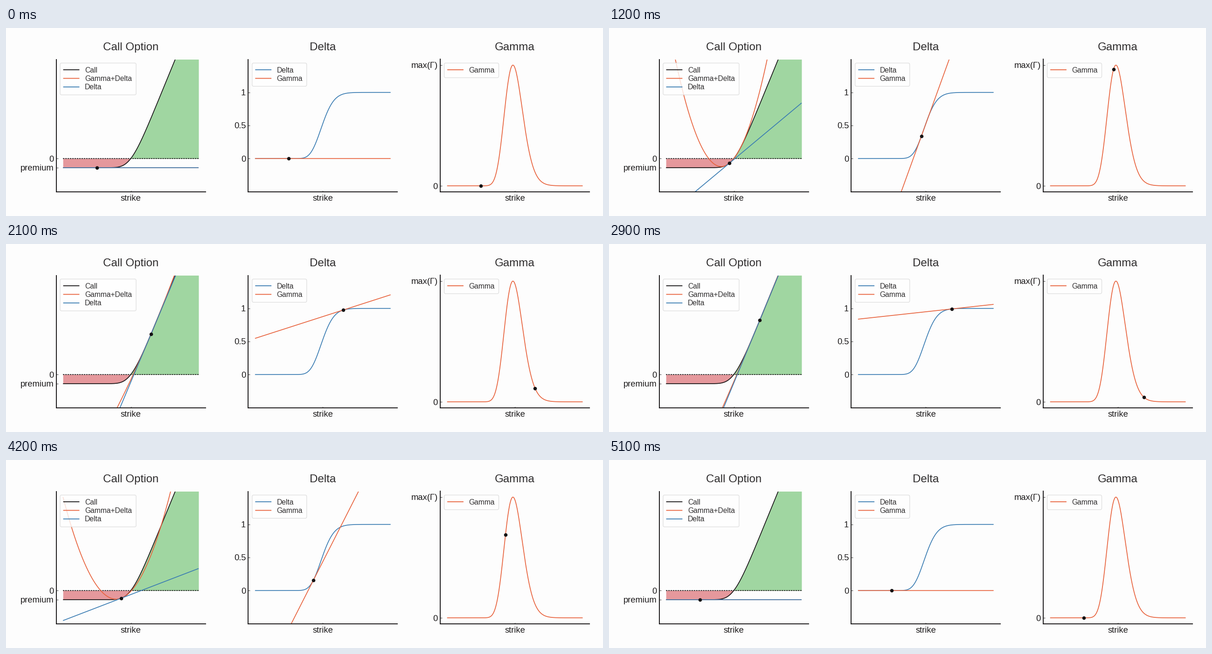
These frames come from a looping animation (1280x405 px, 5.2 s). A matplotlib script:

```python
import math
import numpy as np
import matplotlib.pyplot as plt
from matplotlib.animation import FuncAnimation
from matplotlib.patches import FancyBboxPatch

plt.rcParams["font.family"] = "Liberation Sans"

W, H, DPI = 1280, 405, 80
PX = 72 / DPI  # points per pixel
TOP, BOTTOM, WIDTH = 67.5, 352.5, 320
LEFTS = 107.5, 519.2, 931
FRAMES = 52
VOL = 0.1385  # sigma * sqrt(T), strike = 1

BLACK, BLUE, RED = "#151314", "#3a7cb2", "#e8623c"
PINK, GREEN, PAPER = "#e5989c", "#a0d6a1", "#fdfdfd"

cdf = np.vectorize(lambda v: 0.5 * (1 + math.erf(v / math.sqrt(2))))


def d1(s):
    return np.log(s) / VOL + VOL / 2


def delta(s):
    return cdf(d1(s))


def gamma(s):
    return np.exp(-d1(s) ** 2 / 2) / (math.sqrt(2 * math.pi) * s * VOL)


PREMIUM = float(2 * cdf(VOL / 2) - 1)


def profit(s):
    return s * delta(s) - cdf(d1(s) - VOL) - PREMIUM


def spot(i):
    """Price at step i: up at constant speed, then back down."""
    up = 0.494 + 0.0402 * (i - 1)
    down = 0.5 + 0.0402 * (51 - i)
    return max(0.5, min(up, down))


fig = plt.figure(figsize=(W / DPI, H / DPI), dpi=DPI, facecolor=PAPER)

# Overlay in pixel coordinates for text, legends and the frame edge
over = fig.add_axes([0, 0, 1, 1], zorder=5)
over.set(xlim=(0, W), ylim=(H, 0))
over.axis("off")
over.plot([0, W - 0.5, W - 0.5], [H - 0.5, H - 0.5, 0], color="#a8a8a8", lw=PX)


def label(x, y, text, size=18.4, ha="right", color="#1c1a1b"):
    over.text(x, y, text, fontsize=size * PX, color=color, ha=ha, va="baseline")


def panel(left, title, ylim, yticks):
    ax = fig.add_axes([left / W, 1 - BOTTOM / H, WIDTH / W, (BOTTOM - TOP) / H])
    ax.patch.set_visible(False)
    ax.set(xlim=(-0.1, 2.1), ylim=ylim)
    ax.set_xticks([1], [""])
    ax.set_yticks([v for v, _ in yticks], [""] * len(yticks))
    ax.tick_params(direction="in", length=3.5 * PX, width=0.8 * PX, color=BLACK)
    for side in ("top", "right"):
        ax.spines[side].set_visible(False)
    for side in ("left", "bottom"):
        ax.spines[side].set(linewidth=1.9 * PX, color=BLACK)
    for v, text in yticks:
        y = BOTTOM - (v - ylim[0]) / (ylim[1] - ylim[0]) * (BOTTOM - TOP)
        label(left - 5, y + 6.5, text)
    label(left + WIDTH / 2, 372, "strike", ha="center")
    label(left + WIDTH / 2, 48, title, 24.2, "center", "#2e2c2d")
    return ax


def legend(left, width, rows):
    x, y = left + 8.5, 75.5
    height = 13 + 18.5 * len(rows)
    over.add_patch(FancyBboxPatch((x, y), width, height,
                                  boxstyle="round,pad=0,rounding_size=3",
                                  fc=(1, 1, 1, 0.8), ec="#d9d9d9", lw=1.1 * PX))
    for n, (text, color) in enumerate(rows):
        row = 90 + 18.5 * n
        over.plot([x + 7.5, x + 40.5], [row, row], color=color, lw=1.8 * PX, snap=False)
        label(x + 53, row + 5.5, text, 15.6, "left", "#2e2c2d")


def curve(ax, color, x=(), y=()):
    return ax.plot(x, y, color=color, lw=1.7 * PX, solid_capstyle="butt", snap=False)[0]


def dot(ax):
    return ax.plot([], [], "o", color=BLACK, ms=7.6 * PX, mew=0, zorder=4)[0]


S = np.linspace(0.001, 2, 500)
PROFIT, PEAK = profit(S), float(gamma(math.exp(-1.5 * VOL ** 2)))

call_ax = panel(LEFTS[0], "Call Option", (-0.2, 0.6), [(0, "0"), (-PREMIUM, "premium")])
delta_ax = panel(LEFTS[1], "Delta", (-0.5, 1.5), [(0, "0"), (0.5, "0.5"), (1, "1")])
gamma_ax = panel(LEFTS[2], "Gamma", (-0.048 * PEAK, 1.048 * PEAK), [(0, "0"), (PEAK, "max(Γ)")])

call_ax.fill_between(S, PROFIT, 0, where=PROFIT < 0, color=PINK, lw=0, interpolate=True)
call_ax.fill_between(S, PROFIT, 0, where=PROFIT > 0, color=GREEN, lw=0, interpolate=True)
call_ax.plot([0, 2], [0, 0], color=BLACK, lw=1.6 * PX, ls=(0, (2.1, 1)), snap=False)
curve(call_ax, BLACK, S, PROFIT)
curve(delta_ax, BLUE, S, delta(S))
curve(gamma_ax, RED, S, gamma(S))

quad, line = curve(call_ax, RED), curve(call_ax, BLUE)
slope = curve(delta_ax, RED)
dots = [dot(ax) for ax in (call_ax, delta_ax, gamma_ax)]

legend(LEFTS[0], 163, [("Call", BLACK), ("Gamma+Delta", RED), ("Delta", BLUE)])
legend(LEFTS[1], 117, [("Delta", BLUE), ("Gamma", RED)])
legend(LEFTS[2], 117, [("Gamma", RED)])


def update(i):
    s = spot(i)
    p, d, g = float(profit(s)), float(delta(s)), float(gamma(s))
    step = S - s
    quad.set_data(S, p + d * step + g * step ** 2 / 2)
    line.set_data(S, p + d * step)
    slope.set_data(S, d + g * step)
    for mark, y in zip(dots, (p, d, g)):
        mark.set_data([s], [y])
    return [quad, line, slope, *dots]


anim = FuncAnimation(fig, update, frames=FRAMES, interval=100, repeat=True, repeat_delay=0)
plt.show()
```
